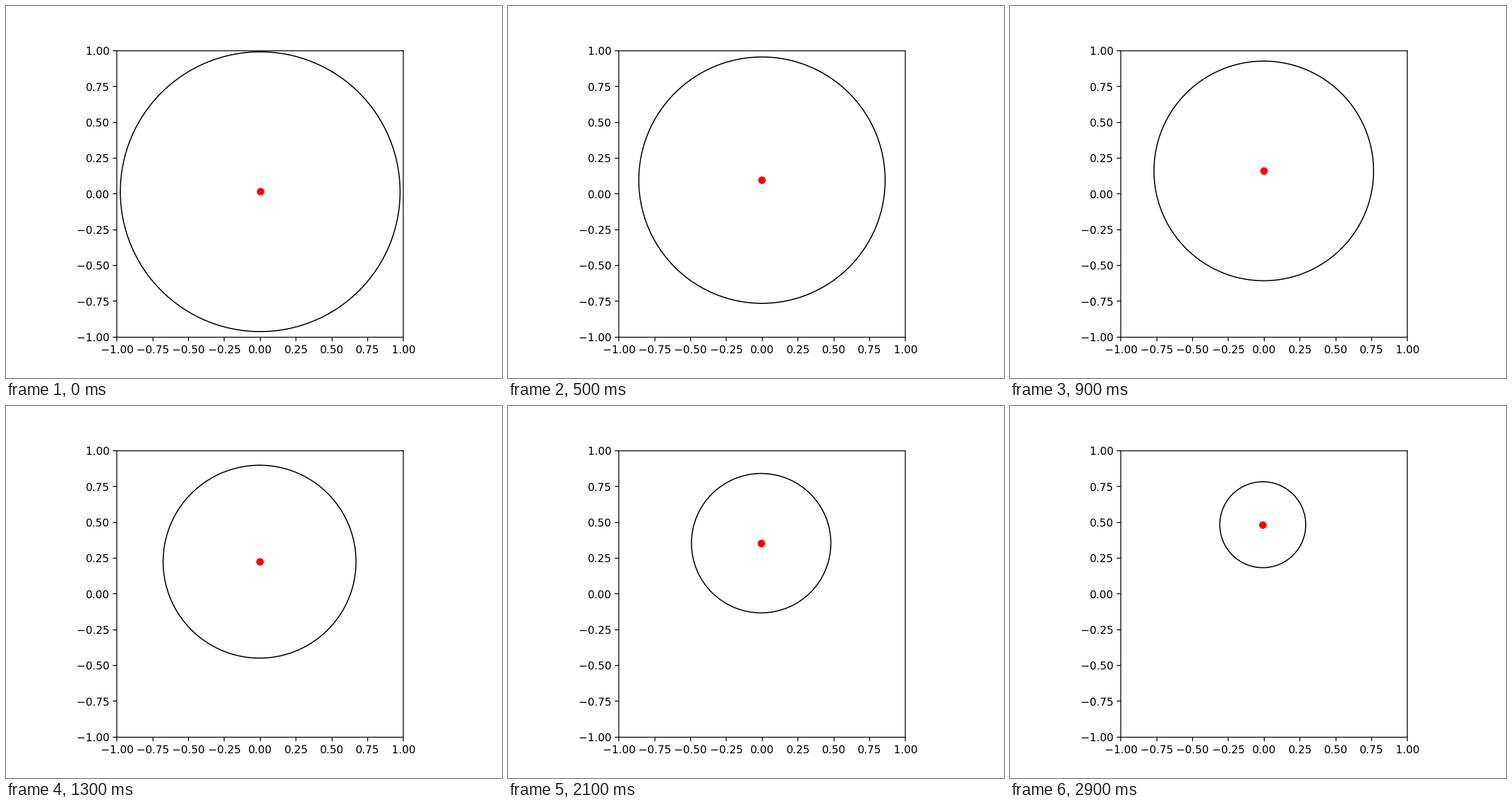
A matplotlib script that plays this animation: 864 by 648 pixels, repeating every 3000 ms.

```python
import matplotlib.pyplot as plt
from matplotlib.animation import FuncAnimation
from matplotlib.patches import Circle

FRAMES = 30
INTERVAL = 100  # ms

# (centre x, centre y, radius) at both ends of the loop
START = (0.0, 0.0150, 1 - 0.7 / 30)
END = (-0.01, 0.4828, 0.3)

plt.rcParams["font.family"] = "DejaVu Sans"

fig, ax = plt.subplots(figsize=(6.4, 4.8), dpi=135)
ax.set_aspect("equal")
ax.set_xlim(-1, 1)
ax.set_ylim(-1, 1)

circle = ax.add_patch(Circle(START[:2], START[2], fill=False))
dot, = ax.plot([START[0]], [START[1]], "ro")


def update(frame):
    t = frame / (FRAMES - 1)
    x, y, radius = (a + (b - a) * t for a, b in zip(START, END))
    circle.set_center((x, y))
    circle.set_radius(radius)
    dot.set_data([x], [y])
    return circle, dot


anim = FuncAnimation(fig, update, frames=FRAMES, interval=INTERVAL,
                     repeat=True, repeat_delay=0)
plt.show()
```
